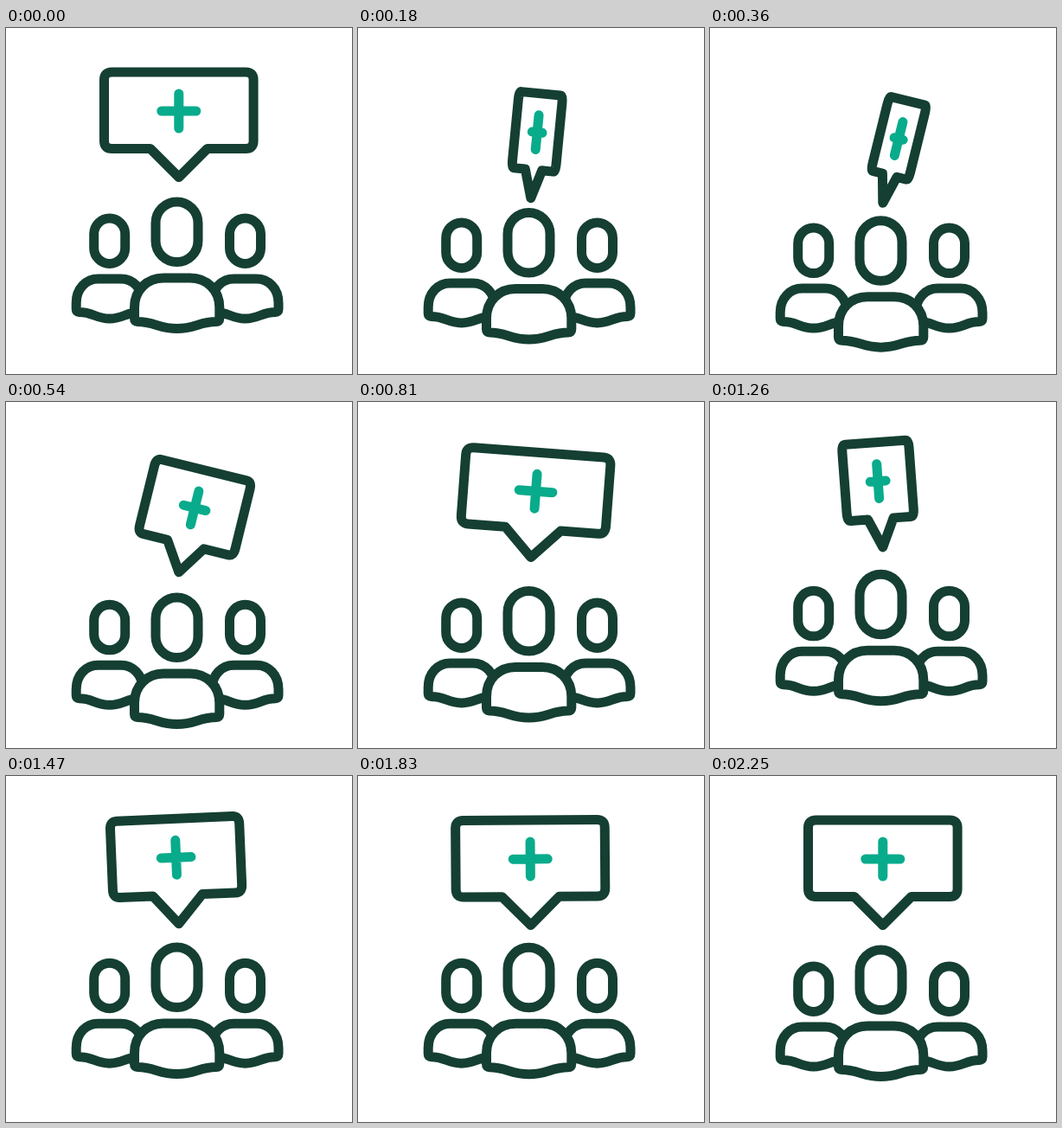
Write an HTML page that moves like this. It is 400 by 400 pixels and loops after 2.34 s.

```html
<!DOCTYPE html>
<html lang="en">
<head>
<meta charset="utf-8">
<title>Team message</title>
<style>
  html, body { margin: 0; width: 100%; height: 100%; overflow: hidden; background: #fff; }
  svg { display: block; width: 100%; height: 100%; }
  .line { fill: #fff; stroke: #143f32; stroke-width: 11; stroke-linecap: round; stroke-linejoin: round; }
  .plus { stroke: #08ab8b; }
</style>
</head>
<body>
<svg viewBox="0 0 400 400">
  <defs>
    <g id="side">
      <rect x="-18" y="220" width="36" height="52.5" rx="18"/>
      <path d="M-38.5 325V318C-38.5 301 -27 290 -13 290H13C27 290 38.5 301 38.5 318V325Q38.5 328.500 35 328.500C19 328.500 16 336 0 336S-19 328.500 -35 328.500Q-38.5 328.500 -38.5 325Z"/>
    </g>
  </defs>
  <g class="line">
    <g id="sides">
      <use href="#side" x="119.7"/>
      <use href="#side" x="276.5"/>
    </g>
    <g id="lead">
      <rect x="173" y="201" width="49" height="69.5" rx="24.5"/>
      <path d="M148.500 336V323C148.500 303 163 289 182 289H213C232 289 246.800 303 246.800 323V336Q246.800 339.500 243 339.500C224 339.500 218 347.500 197.700 347.500S171 339.500 152 339.500Q148.500 339.500 148.500 336Z"/>
    </g>
    <g id="bubble">
      <path id="box"/>
      <path id="plus" class="plus"/>
    </g>
  </g>
</svg>
<script>
const LOOP = 2340, STEP = 30;
const $ = id => document.getElementById(id);

// Progress 0..1 of t from start to end.
const part = (t, start, end) => Math.min(1, Math.max(0, (t - start) / (end - start)));
const out = (t, start, end) => 1 - (1 - part(t, start, end)) ** 2;
const swing = (t, start, end) => (1 - Math.cos(Math.PI * part(t, start, end))) / 2;
const hump = (t, start, end) => Math.sin(Math.PI * part(t, start, end));

// People sink, then rise a little past their place; the outer two lag behind.
const leadY = t => 25 * hump(t, 0, 1075) - 3.3 * hump(t, 1075, 2150);
const sideY = t => 14.5 * hump(t, 60, 1140) - 4.5 * hump(t, 1140, 2150);

// The bubble drops, swings on its tip and turns over and back.
const tipY = t => 30 * out(t, 0, 320) - 36.5 * swing(t, 320, 1160) + 6.5 * out(t, 1160, 1800);
const tilt = t => 14.8 * swing(t, 0, 430) - 20.1 * swing(t, 440, 1160) + 5.3 * out(t, 1160, 2100);
const turn = t => 1 - 2 * out(t, 0, 920) + 2 * out(t, 885, 1675);

// Only the outline narrows as the bubble turns; the line weight stays.
function drawBubble(k) {
  const p = (x, y) => `${(x * k).toFixed(2)} ${y} `;
  const W = 86.3, T = -121.5, B = -33, R = 9;
  $('box').setAttribute('d',
    'M' + p(0, 0) + 'L' + p(-33, B) + 'L' + p(R - W, B) +
    'Q' + p(-W, B) + p(-W, B - R) + 'L' + p(-W, T + R) +
    'Q' + p(-W, T) + p(R - W, T) + 'L' + p(W - R, T) +
    'Q' + p(W, T) + p(W, T + R) + 'L' + p(W, B - R) +
    'Q' + p(W, B) + p(W - R, B) + 'L' + p(33, B) + 'Z');
  $('plus').setAttribute('d',
    'M' + p(-20, -76.5) + 'L' + p(20, -76.5) + 'M' + p(0, -96.5) + 'L' + p(0, -56.5));
}

function frame(now) {
  const t = Math.floor(now % LOOP / STEP) * STEP;
  $('lead').setAttribute('transform', `translate(0 ${leadY(t)})`);
  $('sides').setAttribute('transform', `translate(0 ${sideY(t)})`);
  $('bubble').setAttribute('transform', `translate(199.8 ${172.5 + tipY(t)}) rotate(${tilt(t)})`);
  drawBubble(turn(t));
  requestAnimationFrame(frame);
}
frame(0);
</script>
</body>
</html>
```
